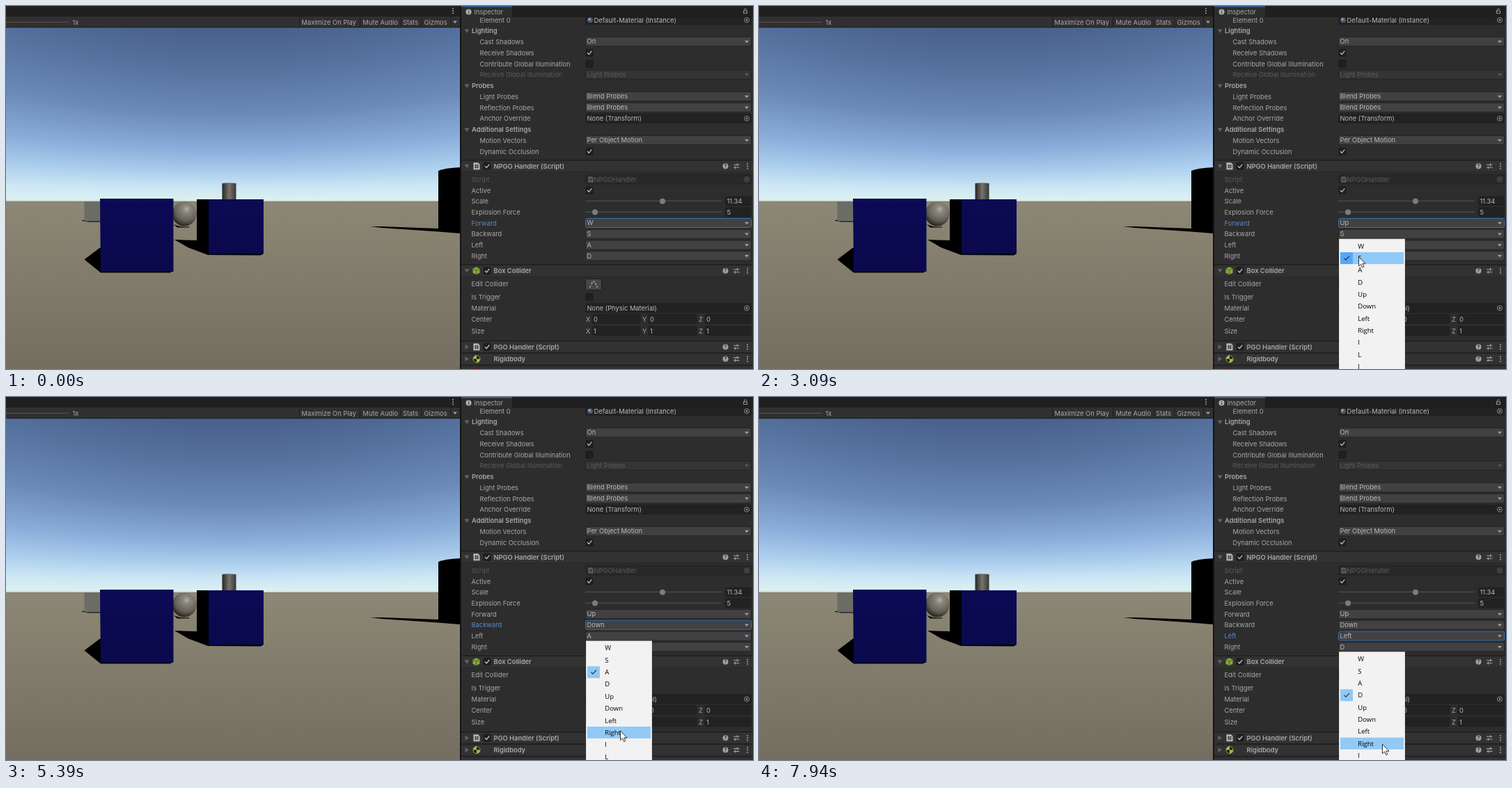
An HTML page for the animation above (8000 ms loop, 1073 px wide and 522 px high).

```html
<!DOCTYPE html>
<html lang="en">
<head>
<meta charset="utf-8">
<title>Key binding inspector</title>
<style>
html, body { margin: 0; width: 100%; height: 100%; overflow: hidden; background: #2d2d2d; }
svg { display: block; width: 1073px; height: 522px; --set: 0; animation: set 8s step-end infinite; }
text { font: 9.35px Inter, Roboto, sans-serif; fill: #a9a9a9; white-space: pre; }
.bold { font-weight: 600; fill: #a9a9a9; }
.value { fill: #bababa; }
.dim { fill: #5c5c5c; }
.blue { fill: #5f86cc; opacity: min(1 + var(--f) - var(--i), 1 + var(--i) - var(--f)); }
.plain { opacity: max(var(--f) - var(--i), var(--i) - var(--f)); }
.old { opacity: calc(1 + var(--i) - var(--set)); }
.new { opacity: calc(var(--set) - var(--i)); }
#rows { --f: max(0, var(--set) - 1); }
#focus { transform: translateY(calc(var(--f) * 15.75px)); }

#menu { --open: 99; transform: translateY(calc(var(--open) * 15.75px)); animation: open 8s step-end infinite; }
#menu text { font: 9.5px "Open Sans", "Noto Sans", sans-serif; fill: #000; }
#hover { --row: 99; transform: translateY(calc(var(--row) * 17.35px)); animation: hover 8s step-end infinite; }
#check { transform: translateY(calc(var(--open) * 17.35px)); }
#check rect { mix-blend-mode: multiply; }
#cursor { animation: move 8s linear infinite, appear 8s step-end infinite; }
#ring { animation: click 8s step-end infinite; }

/* number of bindings already changed */
@keyframes set {
  0% { --set: 0 } 32% { --set: 1 } 55% { --set: 2 } 74.25%, 100% { --set: 3 }
}
/* which binding has its list open, 99 for none */
@keyframes open {
  0%, 31%, 54%, 73.25% { --open: 99 }
  17.4% { --open: 0 } 35.75% { --open: 1 } 60.75% { --open: 2 } 85.75%, 100% { --open: 3 }
}
@keyframes hover {
  0%, 31%, 54%, 73.25% { --row: 99 }
  20.8%, 37.5%, 62.05%, 90.2% { --row: 0 }
  21.8%, 38.3%, 62.8%, 90.95% { --row: 1 }
  22.9%, 39.3%, 63.5%, 91.7% { --row: 2 }
  24%, 41.9%, 64.2%, 92.5% { --row: 3 }
  26.8%, 44.1%, 64.95%, 93.2% { --row: 4 }
  46.3%, 65.7%, 94% { --row: 5 }
  66.4%, 70.2%, 94.75% { --row: 6 }
  67.1%, 98.9%, 100% { --row: 7 }
}
@keyframes appear { 0% { visibility: hidden } 2.75%, 100% { visibility: visible } }
@keyframes click {
  0%, 19.2%, 31.2%, 37%, 54.5%, 60.75%, 74%, 87.7%, 100% { opacity: 0 }
  16.25%, 30%, 34.75%, 53%, 59.75%, 72.25%, 84.75% { opacity: 1 }
}
@keyframes move {
  0%, 2.75% { transform: translate(885px, 424px) }
  12.375%, 20.1% { transform: translate(844px, 310px) }
  24.125%, 25% { transform: translate(858px, 375px) }
  27.875%, 32% { transform: translate(868px, 399px) }
  34.75%, 37% { transform: translate(861px, 326px) }
  38.625% { transform: translate(861px, 360px) }
  39.5%, 40% { transform: translate(862px, 374px) }
  47.25%, 48% { transform: translate(871px, 430px) }
  51.1%, 55% { transform: translate(872px, 433px) }
  58.5%, 61.7% { transform: translate(863px, 344px) }
  67.4%, 69.5% { transform: translate(882px, 480px) }
  71.5%, 75.5% { transform: translate(881px, 462px) }
  80% { transform: translate(883px, 372px) }
  82% { transform: translate(883px, 364px) }
  84%, 89.7% { transform: translate(884px, 357px) }
  95.4%, 98.5% { transform: translate(890px, 487px) }
  99.25%, 100% { transform: translate(895px, 499px) }
}
</style>
</head>
<body>
<svg id="stage" viewBox="0 0 1073 522">
  <defs>
    <linearGradient id="sky" x2="0" y2="1">
      <stop stop-color="#48608a"/><stop offset=".25" stop-color="#56729f"/>
      <stop offset=".5" stop-color="#6b8ab8"/><stop offset=".7" stop-color="#8aadda"/>
      <stop offset=".82" stop-color="#a9cbec"/><stop offset=".92" stop-color="#cbe6f4"/>
      <stop offset=".99" stop-color="#dcf1f1"/><stop offset="1" stop-color="#b9bbae"/>
    </linearGradient>
    <linearGradient id="ground" x2="0" y2="1">
      <stop stop-color="#8d8775"/><stop offset="1" stop-color="#736e60"/>
    </linearGradient>
    <linearGradient id="navy" x2="0" y2="1">
      <stop stop-color="#0b0a54"/><stop offset="1" stop-color="#0a094c"/>
    </linearGradient>
    <linearGradient id="pipe">
      <stop stop-color="#272623"/><stop offset=".5" stop-color="#75736b"/><stop offset="1" stop-color="#383732"/>
    </linearGradient>
    <radialGradient id="ball" cx=".6" cy=".3" r=".75">
      <stop stop-color="#b3afa5"/><stop offset=".2" stop-color="#8b877c"/>
      <stop offset=".65" stop-color="#625f56"/><stop offset="1" stop-color="#191815"/>
    </radialGradient>
    <clipPath id="view"><path d="M0 31H652V522H0Z"/></clipPath>
    <clipPath id="panel"><path d="M654 16H1073V522H654Z"/></clipPath>
  </defs>

  <g clip-path="url(#view)">
    <g id="air"></g>
    <rect y="281.5" width="652" height="241" fill="url(#ground)"/>
    <path d="M108 308.500L113 307.500H136V310.500H118Z"/>
    <path d="M112.500 281H136V309.500H112.500Z" fill="#6c6c67"/>
    <path d="M241 314Q252 319 264 317L262 318.500H246Z"/>
    <circle cx="256" cy="299" r="17.5" fill="url(#ball)"/>
    <path d="M310.500 255Q320 253.500 330.500 255V279H310.500Z" fill="url(#pipe)"/>
    <path d="M135 347.500L112.500 364.500 136 383.500H236L240 381Z"/>
    <path d="M135 277H240.500V382H136Z" fill="url(#navy)"/>
    <path d="M242 336L274 337V278H291L370 356 366 358.500 290 358 262 347.500Z"/>
    <path d="M291 278H370V356L291 357Z" fill="url(#navy)"/>
    <path d="M523 317H540L621 320 652 323V327L621 324.500 540 319Z"/>
    <path d="M621 237Q630 233 652 232V326Q630 325 621 322Z"/>
  </g>

  <g id="bar"></g>
  <g id="inspector" clip-path="url(#panel)"></g>
  <g id="tab"></g>
  <g id="menu">
    <rect x="833" y="319" width="95" height="230" fill="#d2d2d2"/>
    <rect x="833.6" y="319.6" width="93.800" height="230" fill="#f2f2f2"/>
    <rect id="hover" x="835" y="321" width="91" height="17" fill="#91c9f7"/>
    <g id="check">
      <rect x="835" y="321" width="18" height="17" fill="#98d3ff"/>
      <path d="M840.500 329.500L843 332 848 326.500" fill="none" stroke="#1d2b3a" stroke-width="1.100"/>
    </g>
    <g id="keys"></g>
  </g>
  <g id="cursor">
    <circle id="ring" r="9.500" fill="#a3a11c"/>
    <path d="M.5.5V13.800L3.500 11 5.700 15.700 7.900 14.700 5.700 10.200H10Z" fill="#fff" stroke="#000" stroke-width=".8"/>
  </g>
</svg>

<script>
const put = (id, parts) => { document.getElementById(id).innerHTML = parts.flat(9).join(''); };
const text = (x, y, str, cls = '', style = '') =>
  `<text x="${x}" y="${y + 3.4}" class="${cls}" style="${style}">${str}</text>`;
const rect = (x, y, w, h, fill, extra = '') =>
  `<rect x="${x}" y="${y}" width="${w}" height="${h}" fill="${fill}" ${extra}/>`;
const path = (d, fill = 'none', stroke = 'none', w = 1) =>
  `<path d="${d}" fill="${fill}" stroke="${stroke}" stroke-width="${w}"/>`;
const disc = (x, y, r, fill, stroke = 'none') =>
  `<circle cx="${x}" cy="${y}" r="${r}" fill="${fill}" stroke="${stroke}"/>`;

const LABEL = 668.5, INDENT = 680.5, FIELD = 832, END = 1071;
const INK = '#a2a2a2';

const arrow = (x, y) => path(`M${x - 3} ${y - 1.5}h6l-3 3.5z`, INK);
const fold = (y, open = true) =>
  path(open ? `M658.500 ${y - 2.500}h7l-3.500 5.500z` : `M659.500 ${y - 3.500}v7l5.500 -3.500z`, '#626262');
const dots = (x, y) => [-3.3, 0, 3.3].map(d => disc(x, y + d, 1, INK));
const tick = (x, y, on = true) => [
  rect(x - 5, y - 5, 10, 10, '#202020', 'rx="1.500" stroke="#171717" stroke-width=".8"'),
  on ? path(`M${x - 3} ${y}l2.300 2.300 4 -5`, 'none', '#c0c0c0', 1.3) : '',
];
const box = (x, y, w, fill) =>
  rect(x + .5, y - 6.8, w - 1, 13.2, fill, 'rx="2" stroke="#202020" stroke-width=".8"');
const popup = (y, str, dim) => [
  box(FIELD, y, END - FIELD, dim ? '#343434' : '#414141'),
  str ? text(834.5, y - .4, str, dim ? 'dim' : 'value') : '',
  dim ? path(`M1061 ${y - 1.5}h6l-3 3.500z`, '#5c5c5c') : arrow(1064, y),
];
const slot = (y, str, x = 834.5, cls = 'value') => [
  box(FIELD, y, END - FIELD, cls === 'dim' ? '#292929' : '#222'),
  text(x, y, str, cls),
  disc(1064, y, 3.5, 'none', cls === 'dim' ? '#5c5c5c' : '#8c8c8c'),
  disc(1064, y, 1.4, cls === 'dim' ? '#5c5c5c' : '#8c8c8c'),
];
const number = (x, y, w, str) => [box(x, y, w, '#222'), text(x + 2.5, y, str, 'value')];
const slider = (y, thumb, str) => [
  rect(FIELD, y - 1, 196, 1.4, '#4c4c4c'), disc(thumb, y, 4, '#7c7c7c'), number(1033, y, 38, str),
];
const vector = (y, v) => ['X', 'Y', 'Z'].map((axis, i) =>
  [text(833 + i * 81, y, axis), number(841.5 + i * 81, y, i < 2 ? 70 : 67.5, v)]);
const doc = (x, y, s) => [
  path(`M${x - 4.5 * s} ${y - 5 * s}h${6.5 * s}l${2.5 * s} ${2.5 * s}v${7.5 * s}h${-9 * s}z`, s < 1 ? '#666' : '#bebebe'),
  path(`M${x - 1.3 * s} ${y - 3 * s}v${6.5 * s}m${2.6 * s} 0v${-6.5 * s}M${x - 3.2 * s} ${y - s}h${6.4 * s}m0 ${2.6 * s}h${-6.4 * s}`, 'none', '#2d2d2d', .9 * s),
];
const header = (y, title, icon, open, enabled = true) => [
  rect(654, y - 8.5, 419, 17, '#323232'),
  rect(654, y - 9, 419, 1, '#171717'),
  rect(654, y + 8, 419, .8, '#262626'),
  fold(y, open), icon, enabled ? tick(691, y) : '', text(700.5, y, title, 'bold'),
  disc(1033.5, y, 4, INK),
  `<text x="1033.500" y="${y + 2.6}" text-anchor="middle" style="font-size:7px;font-weight:700;fill:#323232">?</text>`,
  path(`M1045 ${y - 2}h8.500M1045 ${y + 2}h8.500M1050.500 ${y - 4}v4M1047.500 ${y}v4`, 'none', INK, 1.1),
  dots(1065, y),
];
const cube = y => [
  path(`M675.500 ${y - 5.500}l5 2.500v6l-5 2.500 -5 -2.500v-6z`, '#86a83f'),
  path(`M670.500 ${y - 3}l5 2.500 5 -2.500M675.500 ${y - .5}v6`, 'none', '#465c1c', .9),
];
const body = y => [
  disc(676, y, 5, '#1c1f14', '#91a850'),
  path(`M676 ${y}v-5a5 5 0 0 0 -5 5zv5a5 5 0 0 0 5 -5z`, '#a3bd58'),
];

// The sky dome bends towards the edges of the view.
const strips = [];
for (let x = 0; x < 652; x += 4) {
  const h = 250.5 * Math.hypot(1, (x + 2 - 326) / 424);
  strips.push(rect(x, 281.5 - h, 4, h, 'url(#sky)'));
}
put('air', strips);

put('bar', [
  rect(0, 0, 654, 14, '#1f1f1f'), rect(0, 14, 652, 17, '#303030'),
  rect(0, 14, 652, 1, '#1a1a1a'), rect(0, 30.3, 652, .9, '#1a1a1a'),
  rect(0, 22.7, 91, 1.2, '#525252'),
  text(95.5, 23.2, '1x'), text(424.5, 23.2, 'Maximize On Play'), text(512.5, 23.2, 'Mute Audio'),
  text(570, 23.2, 'Stats'), text(600.5, 23.2, 'Gizmos'),
  [421, 508, 566.5, 596.5, 638].map(x => rect(x, 15, 1, 15, '#1f1f1f')),
  arrow(645, 23), dots(642, 7),
  rect(652, 0, 2, 522, '#151515'),
]);

put('tab', [
  rect(654, 0, 419, 15, '#1f1f1f'), rect(654, 0, 73, 15.5, '#2d2d2d'),
  rect(654, 0, 73, 1.4, '#2f66a0'), rect(727, 15, 346, .8, '#191919'),
  disc(664.5, 8.5, 4, '#b0b0b0'), rect(664, 8, 1.2, 3, '#2d2d2d'), rect(664, 5.8, 1.2, 1.2, '#2d2d2d'),
  text(672.5, 8.8, 'Inspector'),
  rect(1059.5, 7, 5, 3.5, 'none', `stroke="${INK}" stroke-width=".9"`),
  path('M1060.500 7V5.500a1.600 1.600 0 0 1 3.200 0', 'none', INK, .9),
]);

const bindings = [['Forward', 'W', 'Up'], ['Backward', 'S', 'Down'], ['Left', 'A', 'Left']];
const binding = ([name, was, now], i) => {
  const y = 312.3 + i * 15.75, at = `--i:${i}`;
  return [
    text(LABEL, y, name, 'plain', at), text(LABEL, y, name, 'blue', at), popup(y, ''),
    text(834.5, y - .4, was, 'value old', at), text(834.5, y - .4, now, 'value new', at),
  ];
};

put('inspector', [
  rect(654, 15, 419, 507, '#2d2d2d'),
  text(INDENT, 20.3, 'Element 0'), slot(20.3, 'Default-Material (Instance)', 844.5),
  disc(839, 20.3, 3.8, '#4d6078'), disc(838, 19, 1.5, '#a9b9c9'),
  [[36, 'Lighting'], [115, 'Probes'], [178, 'Additional Settings']].map(([y, s]) =>
    [fold(y), text(669, y, s, 'bold')]),
  text(INDENT, 51.7, 'Cast Shadows'), popup(51.3, 'On'),
  text(INDENT, 67.4, 'Receive Shadows'), tick(838, 67.3),
  text(INDENT, 83.2, 'Contribute Global Illumination'), tick(838, 83, false),
  text(INDENT, 99, 'Receive Global Illumination', 'dim'), popup(98.7, 'Light Probes', true),
  text(INDENT, 130.5, 'Light Probes'), popup(130.2, 'Blend Probes'),
  text(INDENT, 146.2, 'Reflection Probes'), popup(146, 'Blend Probes'),
  text(INDENT, 162, 'Anchor Override'), slot(161.8, 'None (Transform)'),
  text(INDENT, 193.5, 'Motion Vectors'), popup(193.2, 'Per Object Motion'),
  text(INDENT, 209.2, 'Dynamic Occlusion'), tick(838, 209),

  header(230.3, 'NPGO Handler (Script)', doc(676, 230.3, 1), true),
  text(LABEL, 249.4, 'Script', 'dim'), slot(249.4, 'NPGOHandler', 844.5, 'dim'), doc(840, 249.4, .8),
  text(LABEL, 265.2, 'Active'), tick(838, 265),
  text(LABEL, 281, 'Scale'), slider(280.7, 943, '11.34'),
  text(LABEL, 296.7, 'Explosion Force'), slider(296.5, 846, '5'),
  '<g id="rows">', bindings.map(binding),
  rect(832.5, 305.5, 238, 13, 'none', 'id="focus" rx="2" stroke="#3a72b0"'), '</g>',
  text(LABEL, 359.5, 'Right'), popup(359.5, 'D'),

  header(380.7, 'Box Collider', cube(380.7), true),
  text(LABEL, 400, 'Edit Collider'),
  rect(832.5, 392.5, 23, 16, '#464646', 'rx="2" stroke="#1d1d1d"'),
  path('M839 404l2.500 -5.500 3 -2.500 2.500 3.500 2 4.500', 'none', '#8a8a8a', .8),
  [[839, 404], [841.5, 398.5], [844.5, 396], [847, 399.5], [849, 404]].map(([x, y]) => disc(x, y, 1.1, INK)),
  text(LABEL, 419, 'Is Trigger'), tick(838, 418.5, false),
  text(LABEL, 434.7, 'Material'), slot(434.5, 'None (Physic Material)'),
  text(LABEL, 450.4, 'Center'), vector(450.2, '0'),
  text(LABEL, 467.5, 'Size'), vector(467.3, '1'),

  header(490.2, 'PGO Handler (Script)', doc(676, 490.2, 1), false),
  header(507.6, 'Rigidbody', body(507.6), false, false),
  rect(654, 516.4, 419, 6, '#323232'), rect(654, 516.4, 419, 1, '#171717'),
  rect(672, 520.5, 8, 2, '#4a1f22'),
]);

put('keys', ['W', 'S', 'A', 'D', 'Up', 'Down', 'Left', 'Right', 'I', 'L', 'J', 'M'].map((key, i) =>
  text(860.3, 329.5 + i * 17.35, key)));
</script>
</body>
</html>
```
